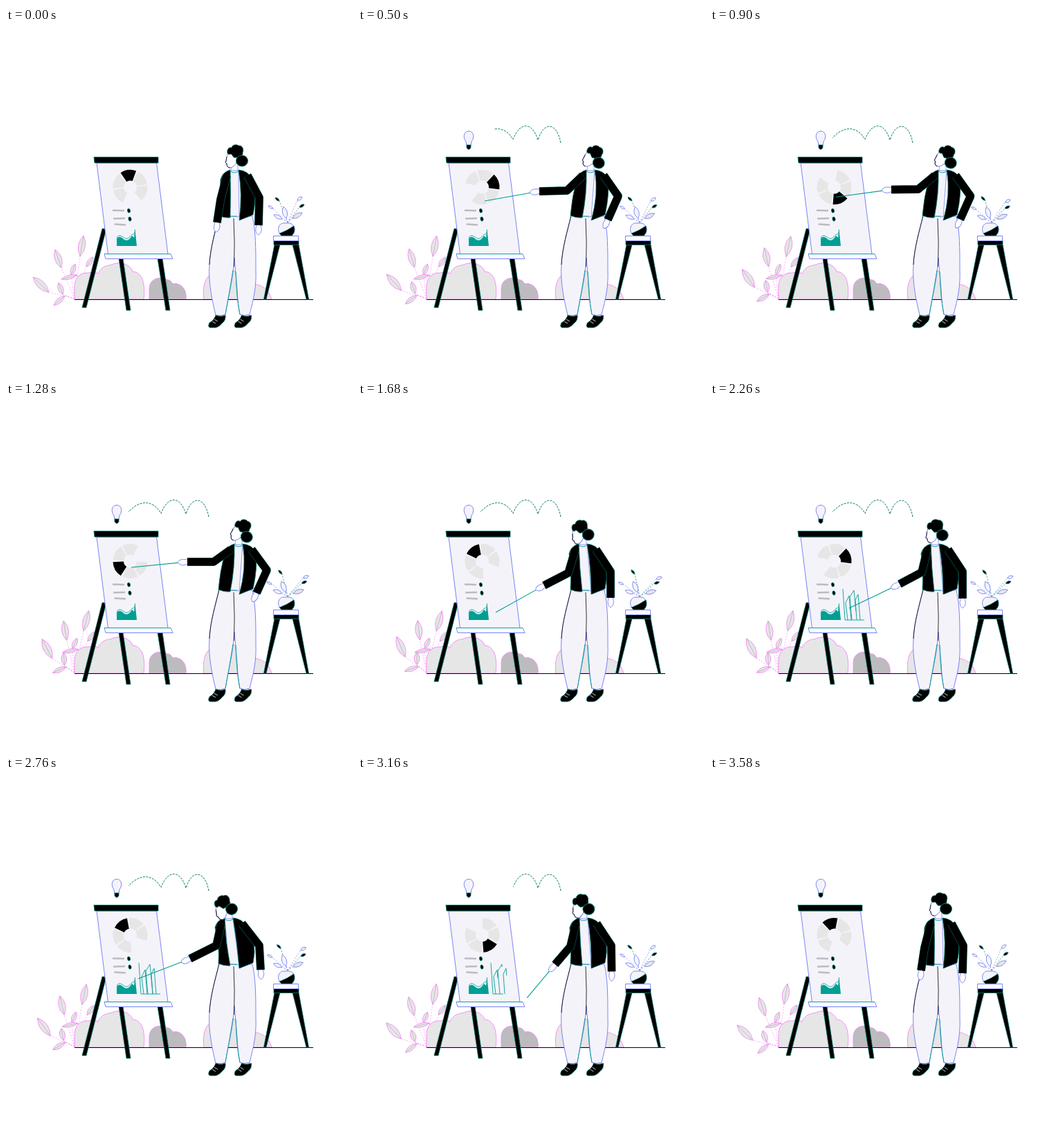
An HTML page with a canvas for the animation above (3600 ms loop, 500x500 px).

```html
<!DOCTYPE html>
<html lang="en">
<head>
<meta charset="utf-8">
<title>Presentation</title>
<style>
html, body { margin: 0; width: 100%; height: 100%; overflow: hidden; background: #fff; }
canvas { display: block; }
</style>
</head>
<body>
<canvas id="stage" width="500" height="500"></canvas>
<script>
const ctx = document.getElementById('stage').getContext('2d');
const LOOP = 3600, TAU = Math.PI * 2, RAD = Math.PI / 180;
const BLACK = '#000', TEAL = '#009f92', EDGE = '#067a70', PALE = '#f4f3fa',
      BLUE = '#7b83f5', PINK = '#fa8cfa', GREY = '#e6e6e6';

// time, collar x, hair x/y, head tilt, then x/y of: left elbow, left wrist,
// pointer tip, right elbow, right wrist
const POSES = [
  [0, 324, 332, 178, 0, 310, 248, 305, 281, 301, 350, 366, 245, 365, 285],
  [500, 330, 343, 179, 16, 302, 235, 262, 236, 183, 250, 376, 243, 361, 277],
  [1280, 330, 343, 179, 16, 300, 231, 262, 231, 181, 239, 377, 243, 362, 276],
  [1680, 319, 321, 180, -12, 304, 247, 269, 265, 199, 304, 365, 245, 365, 283],
  [2260, 319, 326, 179, -3, 306, 246, 274, 263, 201, 298, 365, 245, 365, 284],
  [2760, 316, 313, 182, -19, 304, 245, 266, 264, 191, 293, 366, 245, 368, 280]
];
POSES.push([3580, ...POSES[0].slice(1)]);
const SPIN = [[0, 263], [500, 340], [1280, 510], [1680, 592], [2260, 700], [2760, 952], [3600, 1343]];

const lerp = (a, b, p) => a + (b - a) * p;
const clamp = v => Math.max(0, Math.min(1, v));
const smooth = p => p * p * (3 - 2 * p);
const span = (t, a, b) => smooth(clamp((t - a) / (b - a)));

function sample(keys, t, ease) {
  let i = 0;
  while (i < keys.length - 2 && t >= keys[i + 1][0]) i++;
  const [a, b] = [keys[i], keys[i + 1]];
  const p = ease(clamp((t - a[0]) / (b[0] - a[0])));
  return a.slice(1).map((v, k) => lerp(v, b[k + 1], p));
}

function draw(path, fill, stroke, width = 1, dash = []) {
  const p = typeof path === 'string' ? new Path2D(path) : path;
  if (fill) { ctx.fillStyle = fill; ctx.fill(p); }
  if (stroke) {
    ctx.strokeStyle = stroke;
    ctx.lineWidth = width;
    ctx.setLineDash(dash);
    ctx.stroke(p);
  }
}
const solid = path => draw(path, BLACK, EDGE, 0.8);

function oval(x, y, rx, ry, fill, stroke, turn = 0) {
  const p = new Path2D();
  p.ellipse(x, y, rx, ry, turn, 0, TAU);
  draw(p, fill, stroke);
}

function turned(x, y, degrees, paint) {
  ctx.save();
  ctx.translate(x, y);
  ctx.rotate(degrees * RAD);
  paint();
  ctx.restore();
}

// Leaf on a dashed stem; all points are relative to the pivot of its sway.
function leaf([px, py], [bx, by, tx, ty, w, swing], sway, fill, stroke, vein) {
  turned(px, py, swing * sway, () => {
    const [x1, y1, x2, y2] = [bx - px, by - py, tx - px, ty - py];
    const len = Math.hypot(x2 - x1, y2 - y1);
    const nx = (y1 - y2) / len * w, ny = (x2 - x1) / len * w;
    const mx = (x1 + x2) / 2, my = (y1 + y2) / 2;
    draw(`M0 0L${x1} ${y1}`, null, stroke, 0.7, [2, 2]);
    draw(`M${x1} ${y1}Q${mx + nx} ${my + ny} ${x2} ${y2}Q${mx - nx} ${my - ny} ${x1} ${y1}Z`, fill, stroke, 0.9);
    if (vein) draw(`M${x1} ${y1}L${x2} ${y2}`, null, vein, 0.6);
  });
}

function leftPlant(sway) {
  [[62, 382, 39, 360, 11, 23], [80, 347, 71, 320, 10, 12], [107, 330, 112, 300, 10, 6],
   [85, 387, 69, 401, 7, 22], [82, 385, 76, 368, 8, 20], [94, 357, 100, 341, 7, 4],
   [103, 357, 80, 363, 6, 4], [116, 345, 126, 331, 7, 3]
  ].forEach(l => leaf([99, 391], l, sway, GREY, PINK, '#aaa'));
}

function scenery() {
  draw('M99 392V374C99 360 108 353 119 354Q127 351 133 355C139 341 151 344 155 341C167 337 181 343 183 352C196 352 202 368 199 392Z', GREY, PINK);
  draw('M207 392V376C208 362 222 358 233 364Q237 363 241 370C252 367 262 378 260 392Z', '#bcbcbe', PINK);
  draw('M286 392C283 368 291 352 308 353C330 347 349 354 354 370C368 370 379 376 384 392Z', GREY, PINK);
  draw('M99 392.5H444', null, BLACK);
}

function sideTable(sway) {
  solid('M388 313H396L376 392H372.5Z');
  solid('M414 313H423L437.5 392H434Z');
  solid('M387 307H423V313.500H387Z');
  draw('M386.500 300.500H422.500V307.500H386.500Z', '#fff', BLUE);
  const root = [407, 281];
  [[386, 261, 379, 257, 3, -7, PALE, BLUE], [395, 250, 389, 245, 3, 9, BLACK, EDGE],
   [421, 249, 428, 244, 4, 20, PALE, BLUE], [424, 259, 431, 255, 3.500, 11, BLACK, EDGE],
   [405, 275, 401, 258, 7, -9, PALE, BLUE], [414, 275, 428, 267, 6, 14, GREY, BLUE],
   [399, 276, 387, 270, 5, -6, PALE, BLUE]
  ].forEach(l => leaf(root, l, sway, l[6], l[7]));
  draw('M398 300C390 293 394 282 401 282H410C418 284 419 295 413 300Z', PALE, BLUE);
  solid('M398 300L395 297Q406 293 416 286Q419 294 413 300Z');
}

function easel() {
  solid('M139 290H145L116 404H110Z');
  solid('M163 333H169L180 408H174Z');
  solid('M219 333H226L237 408H231Z');
  draw('M131 195H217.500L234 327H147.500Z', PALE, BLUE);
  draw('M142 326.500H238L241 333.500H144Z', '#fff', BLUE);
  draw('M142 326.500H238', null, TEAL, 0.8);
  solid('M127 186.500H220V195H128Z');
}

function donut(angle) {
  for (const i of [1, 2, 4, 5, 0]) {
    const mid = (angle + i * 60) * RAD, half = 27 * RAD;
    const p = new Path2D();
    p.arc(179.5, 230, 25, mid - half, mid + half);
    p.arc(179.5, 230, 9.5, mid + half, mid - half, true);
    p.closePath();
    draw(p, i ? GREY : BLACK);
  }
}

function board(t) {
  donut(sample(SPIN, t, p => p)[0]);
  draw('M154 263.500L171 264M155 275.500L172 275M156.500 283.500L173 284.500', null, '#bcbcbe', 2.6);
  oval(177.5, 264, 2, 3, BLACK, EDGE, -0.2);
  oval(179, 276, 2, 3, BLACK, EDGE, -0.2);
  draw('M160 315V304C164 299 168 303 171 306C177 309 180 303 182 300L185 303L186.500 291L189 315Z', TEAL);
  draw('M160 303C163 297 168 301 172 304C178 306 180 299 183 298Q186 299 186.500 291', PALE, TEAL, 0.8);

  const shown = span(t, 1720, 2450) * (1 - span(t, 2900, 3450));
  if (shown <= 0) return;
  const trace = (d, length, p) => draw(d, null, TEAL, 0.9, [length * clamp(p), length]);
  trace('M192 270L195 315H223', 74, shown * 1.5);
  ['M199 315L196 290L201 280L204 315', 'M205 315L202 282L208 272L212 315', 'M212 315L210 286L214 278L217 315']
    .forEach(d => trace(d, 90, shown));
}

function idea(t) {
  const arcs = span(t, 0, 680) * (1 - span(t, 2850, 3560));
  if (arcs > 0) {
    ctx.save();
    ctx.beginPath();
    ctx.rect(lerp(295, 176, arcs), 135, 130, 40);
    ctx.clip();
    draw('M293 166C287 135 268 135 260 162C252 135 234 135 224 161C213 142 194 140 177 159', null, EDGE, 1, [3, 1.5]);
    ctx.restore();
  }
  const size = span(t, 10, 260);
  if (size <= 0) return;
  ctx.save();
  ctx.translate(160, 172);
  ctx.scale(size, size);
  draw('M-3 -2L-4 -8C-9 -14 -7 -23 0 -23C7 -23 9 -14 4 -8L3 -2Z', PALE, BLUE);
  solid('M-3 -3H3V1Q0 6 -3 1Z');
  ctx.restore();
}

function arm(sx, sy, ex, ey, wx, wy) {
  ctx.lineJoin = 'round';
  const d = `M${sx} ${sy}Q${lerp(sx, ex, .7)} ${lerp(sy, ey, .7)} ${ex} ${ey}L${wx} ${wy}`;
  draw(d, null, EDGE, 12);
  draw(d, null, BLACK, 11);
}

function hand(wx, wy, angle) {
  turned(wx, wy, angle / RAD, () =>
    draw('M-1 -3L6 -4.500Q12 -4 14 0Q12 4 6 4L-1 3Z', '#fff', BLUE, 0.9));
}

function legs() {
  draw('M308 271C303 292 295 318 294 342C292 367 298 394 303 415Q310 417 317 414C321 388 328 366 330 332L334 378Q335 400 338 414Q345 417 352 414C358 390 362 374 361 350C361 320 361 293 356 272Z', PALE, BLUE);
  draw('M308 271C303 292 295 318 294 342M329 275Q331 310 329.500 345', null, BLACK, 0.8);
  draw('M328 350Q323 382 317 414M332 352Q333 390 338 414', null, TEAL, 0.9);
  for (const [x, y] of [[0, 0], [37.5, 0]]) {
    ctx.save();
    ctx.translate(x, y);
    solid('M303 415Q301 422 294 426Q291 432 295 433H303Q308 432 313 426Q318 422 317 415Q310 418 303 415Z');
    draw('M301 421L306 424M298 424L303 427', null, '#fff', 0.8);
    ctx.restore();
  }
}

function head(x, y, tilt) {
  turned(x, y, tilt, () => {
    draw('M-6 0C-12 1 -13 8 -14 14Q-16 17 -13 18Q-13 24 -8 24Q-2 23 2 15L1 2Z', '#fff', BLUE);
    draw('M-13 8L-14 14Q-16 17 -13 18Q-13 24 -8 24', null, BLACK, 0.8);
    solid('M-12 3C-13 -3 -10 -6 -6 -5C-5 -10 2 -10 4 -8C10 -9 12 -2 10 2C11 8 4 10 0 9C-3 11 -5 5 -7 4Q-10 6 -12 3Z');
    oval(9, 14, 8.5, 8, BLACK, EDGE);
  });
}

function presenter(t) {
  const [n, hx, hy, tilt, ex, ey, wx, wy, px, py, rex, rey, rwx, rwy] = sample(POSES, t, smooth);
  const aim = Math.atan2(py - wy, px - wx);
  draw(`M${wx + 9 * Math.cos(aim)} ${wy + 9 * Math.sin(aim)}L${px} ${py}`, null, TEAL, 1.1);
  legs();
  const grip = Math.atan2(wy - ey, wx - ex);
  hand(rwx, rwy, Math.atan2(rwy - rey, rwx - rex));
  hand(wx, wy, lerp(aim, grip, 0.3));

  draw(`M${n + 2} 194H${n + 11}V207H${n + 1}Z`, '#fff', BLUE, 0.8);
  draw(`M${n} 206H${n + 12}L337 273L322 272Z`, PALE, BLUE, 0.8);
  draw(`M${n} 207Q${n + 6} 211 ${n + 12} 207M322 272H334`, null, TEAL, 0.9);
  solid(`M${n} 205Q${n - 11} 208 ${n - 14} 219Q309 245 307 271Q315 275 324 274Q${n + 1} 240 ${n} 205Z`);
  solid(`M${n + 12} 205Q${n + 25} 206 ${n + 31} 217Q364 238 357 270Q347 274 337 278Q${n + 18} 240 ${n + 12} 205Z`);
  arm(n - 5, 213, ex, ey, wx, wy);
  arm(n + 25, 213, rex, rey, rwx, rwy);
  head(hx, hy, tilt);
}

function frame(now) {
  const t = now % LOOP;
  const sway = (1 - Math.cos(t / LOOP * TAU)) / 2;
  ctx.fillStyle = '#fff';
  ctx.fillRect(0, 0, 500, 500);
  leftPlant(sway);
  scenery();
  sideTable(sway);
  easel();
  board(t);
  idea(t);
  presenter(t);
}

const start = performance.now();
(function tick() {
  frame(performance.now() - start);
  requestAnimationFrame(tick);
})();
</script>
</body>
</html>
```
